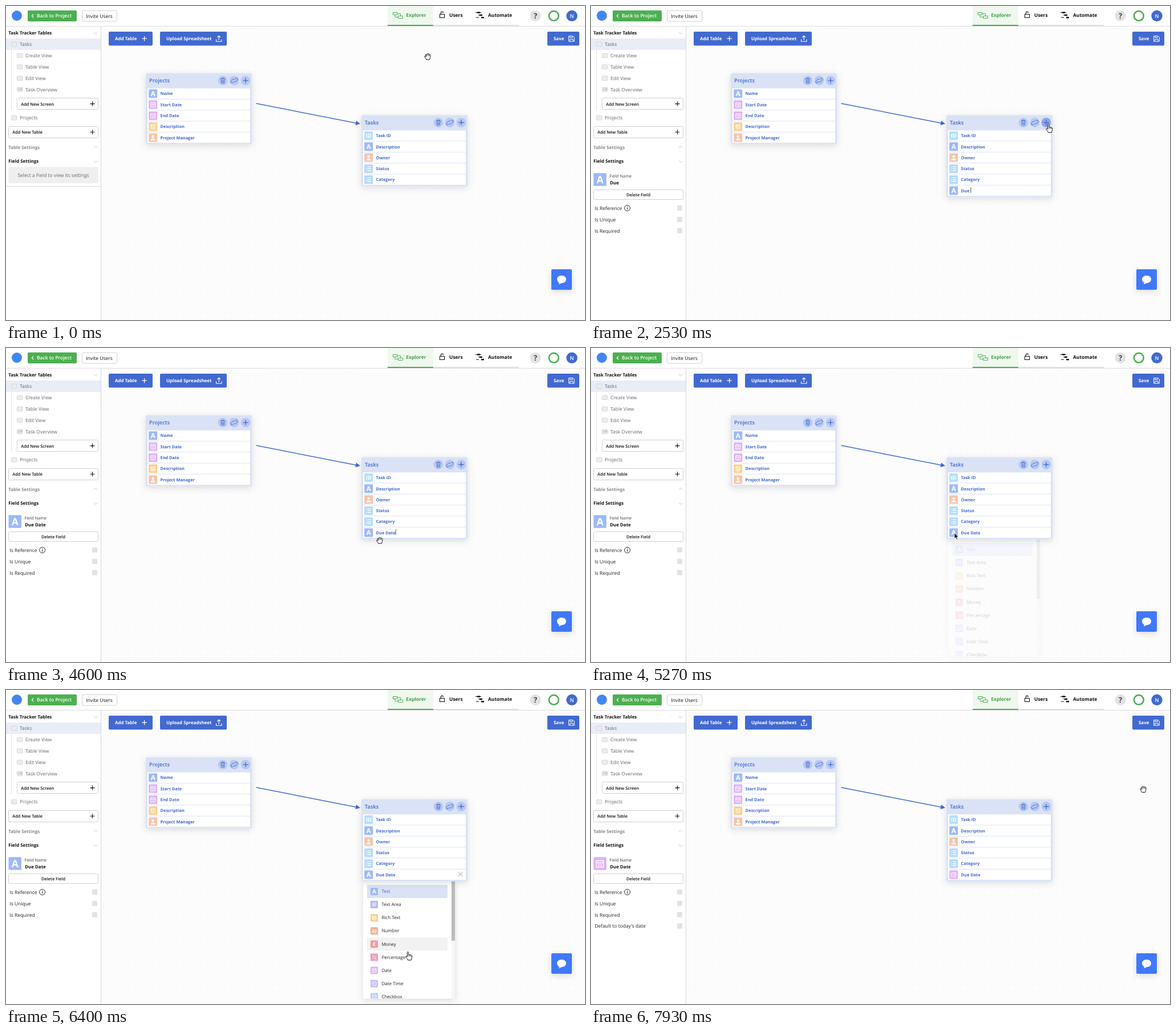
An HTML page that plays this animation: 1015 px wide and 551 px high, repeating every 8 s.

```html
<!DOCTYPE html>
<html lang="en">
<head>
<meta charset="utf-8">
<title>Table builder</title>
<style>
html, body { margin: 0; width: 100%; height: 100%; overflow: hidden; background: #fff; }
svg { display: block; width: 100vw; height: 100vh; }
text { font-family: "Open Sans", "Noto Sans", sans-serif; text-rendering: geometricPrecision; white-space: pre; }
</style>
</head>
<body>
<svg viewBox="0 0 1015 551" xmlns="http://www.w3.org/2000/svg">
  <defs>
    <pattern id="dots" x="167" y="36" width="10.58" height="10.58" patternUnits="userSpaceOnUse">
      <circle cx="5.3" cy="5.3" r=".6" fill="#e9e9ec"/>
    </pattern>
    <filter id="soft" x="-20%" y="-20%" width="140%" height="150%">
      <feDropShadow dx="0" dy="3" stdDeviation="6" flood-opacity=".13"/>
    </filter>
    <clipPath id="menuClip"><rect x="626" y="336" width="155" height="205.5"/></clipPath>
  </defs>
  <g id="base"></g>
  <g id="live"></g>
  <g id="mouse"></g>
</svg>
<script>
const BLUE = '#4169cf', GREEN = '#4caf50', PALE = '#dae2f5', INK = '#111', GREY = '#666';
const $ = id => document.getElementById(id);

const text = (x, y, s, size = 8.46, weight = 400, fill = INK, anchor = 'start') =>
  `<text x="${x}" y="${y}" font-size="${size}" font-weight="${weight}" fill="${fill}" text-anchor="${anchor}">${s}</text>`;
const rect = (x, y, w, h, fill, extra = '') =>
  `<rect x="${x}" y="${y}" width="${w}" height="${h}" fill="${fill}" ${extra}/>`;
const circle = (x, y, r, fill, extra = '') => `<circle cx="${x}" cy="${y}" r="${r}" fill="${fill}" ${extra}/>`;
const line = (d, color, w = 1, extra = '') =>
  `<path d="${d}" fill="none" stroke="${color}" stroke-width="${w}" ${extra}/>`;
const at = (x, y, body, scale = 1) => `<g transform="translate(${x} ${y}) scale(${scale})">${body}</g>`;
const plus = (x, y, r, color, w = 1.1) => line(`M${x - r} ${y}h${2 * r}M${x} ${y - r}v${2 * r}`, color, w);
const outlined = (x, y, w, h) => rect(x, y, w, h, '#fff', 'rx="2" stroke="#d0d0d0"');

// Field type icons, drawn on a 16 unit square
const glyph = (s, size) => text(0, size * .36, s, size, 700, '#fff', 'middle');
const white = (d, w = 1.2) => line(d, '#fff', w);
const calendar = white('M-4.5-3.5h9v8h-9zM-4.5-1h9M-2.2-5v2M2.2-5v2M-2.5 1h1.2M-.6 1h1.2M1.3 1h1.2M-2.5 2.8h1.2M-.6 2.8h1.2M1.3 2.8h1.2', 1);
const TYPES = {
  text: ['#9db9fb', glyph('A', 12.5)],
  area: ['#b1b6fa', white('M-4.5-3h9M-4.5 0h9M-4.5 3h9', 1.4)],
  rich: ['#f6d18f', white('M-.5-3.5h5M-.5-1h5M-4.5 1.5h9M-4.5 4h9') + rect(-4.5, -4, 3, 3.5, '#fff')],
  number: ['#f3b08e', glyph('42', 9.5)],
  money: ['#ee9f9a', glyph('£', 10.5)],
  percent: ['#ef9ab8', white('M-4 4L4-4') + circle(-2.7, -2.7, 1.4, 'none', 'stroke="#fff"') + circle(2.7, 2.7, 1.4, 'none', 'stroke="#fff"')],
  date: ['#deb0fb', calendar],
  time: ['#c9bff9', circle(0, 0, 4.5, 'none', 'stroke="#fff" stroke-width="1.1"') + white('M0-2.5V.3L2 1.5', 1)],
  check: ['#bccafa', white('M-4-4h8v8h-8zM-2 0L-.5 1.7L2.3-1.6', 1.1)],
  id: ['#b4dff8', glyph('ID', 10)],
  person: ['#f8c4a6', circle(0, -2.2, 2.4, '#fff') + '<path d="M-4.5 5C-4.5 0 4.5 0 4.5 5z" fill="#fff"/>'],
  list: ['#b3d8fb', white('M-4.8-3.5h1.6M-2-3.5h6.8M-4.8 0h1.6M-2 0h6.8M-4.8 3.5h1.6M-2 3.5h6.8', 1.5)]
};
const icon = (type, x, y, size) =>
  at(x, y, rect(-8, -8, 16, 16, TYPES[type][0], 'rx="1"') + TYPES[type][1], size / 16);

const ROW = 19.3;
function card(x, y, title, fields, hot) {
  const tool = (cx, body, on) => circle(cx, 13, 8.4, on ? '#8ea7e3' : '#b8c8f0') + body;
  const rows = fields.map(([type, name], i) => {
    const cy = 36 + i * ROW;
    return rect(3, cy - 9.2, 180, 18.3, '#fff') + icon(type, 12.7, cy, 15) + text(25.6, cy + 2.7, name, 7.36, 700, BLUE);
  }).join('');
  return at(x, y,
    rect(0, 0, 186, 28.3 + fields.length * ROW, PALE, 'rx="3" filter="url(#soft)"') +
    text(6, 16.4, title, 9.3, 600, BLUE) +
    tool(135, line('M131 10h8M133.5 10v-1.6h3V10M132 10.2l.6 7.4h4.8l.6-7.4M134.1 12v4M135.9 12v4', BLUE, .9)) +
    tool(155, line('M154 15l-1.5 1.6a2 2 0 0 1-2.9-2.9l2.6-2.6a2 2 0 0 1 2.9 0M156 11l1.5-1.6a2 2 0 0 1 2.9 2.9l-2.6 2.6a2 2 0 0 1-2.9 0', BLUE, 1)) +
    tool(175, plus(175, 13, 4.6, BLUE, 1.3), hot) + rows);
}

function header() {
  const tab = (x, s, color) => text(x, 19, s, 8.46, 700, color);
  return rect(0, 0, 1015, 35, '#fff') + line('M0 35.5H1015', '#dcdcdc') +
    circle(19, 17, 9, '#4285f4') +
    rect(38, 7.7, 86, 19.3, GREEN, 'rx="2"') + line('M48.2 14.5L45.4 17.4L48.2 20.3', '#fff', 1.2) +
    text(54, 20.4, 'Back to Project', 8.46, 600, '#fff') +
    outlined(133.5, 8, 61, 19) + text(140.3, 20.9, 'Invite Users', 8.5, 500) +
    rect(669, 0, 80, 35, '#eff7ef') + rect(669, 33, 80, 2, GREEN) + rect(749, 33, 150, 2, '#d3ebd4') +
    line('M678.5 11.5h7.5v4h-7.5zM687.5 17.5h8v4h-8zM686 13.5h5.5v4M682 15.5v4h5.5', GREEN, 1) +
    tab(701.3, 'Explorer', '#43a047') +
    line('M760.5 14.5h8v6h-8zM762.3 14.5v-2a2.2 2.2 0 0 1 4.4-.4', INK, 1.1) + tab(777, 'Users', INK) +
    line('M823 11.5h4M830 11.5h3M828 15.8h4M824 20.2h5M834 20.2h4', INK, 1) +
    line('M826 11.5h5M830 16h5M833 20.3h5', INK, 2.6) + tab(845, 'Automate', INK) +
    circle(928, 17.3, 9.6, '#e2e2e2') + text(928, 22, '?', 13, 700, '#444', 'middle') +
    circle(960.3, 17.3, 8.4, '#fff', `stroke="${GREEN}" stroke-width="2.6"`) +
    circle(992, 17.3, 9.7, BLUE) + text(992, 20.6, 'N', 9, 600, '#fff', 'middle');
}

function sidebar() {
  const folder = (x, y) => rect(x, y - 4, 9.5, 7.5, '#ededed', 'rx="1" stroke="#cfcfcf" stroke-width=".8"');
  const chevron = (y, up) => line(`M154 ${y + up}l3.3 ${-3 * up}l3.3 ${3 * up}`, '#bbb', .8);
  const views = ['Create View', 'Table View', 'Edit View', 'Task Overview'];
  return rect(0, 36, 166, 515, '#fff') + line('M166.5 36V551', '#d4d4d4') +
    text(4.3, 49.9, 'Task Tracker Tables', 7.93, 700) + chevron(47, -1) +
    rect(0, 57, 166, 20, '#e9edf8') + folder(9.5, 67.3) + text(24, 70.1, 'Tasks', 8.46, 400, GREY) +
    line('M9.5 77V182', '#dde1ea') +
    views.map((s, i) => folder(19.5, 87.2 + i * 19.9) + text(34, 90 + i * 19.9, s, 8.46, 400, GREY)).join('') +
    line('M21 145h2.5M21 147.5h2.5M25 145h2.5v2.5H25z', '#aaa', .8) +
    outlined(19.5, 161.5, 142, 20) + text(26.3, 174.7, 'Add New Screen', 7.4, 600) + plus(151.4, 171.6, 4, INK) +
    folder(9.5, 196.5) + text(24, 199.3, 'Projects', 8.46, 400, GREY) +
    outlined(4.5, 211.5, 157, 20) + text(11.3, 224.2, 'Add New Table', 7.4, 600) + plus(151.4, 221.3, 4, INK) +
    text(4.3, 250.9, 'Table Settings', 7.93, 700, '#8b8b8b') + chevron(248, 1) +
    text(4.3, 275.2, 'Field Settings', 7.93, 700) + chevron(272.5, -1);
}

function toolbar() {
  const button = (x, w, tx, s) => rect(x, 45, w, 24.5, BLUE, 'rx="2"') + text(tx, 60, s, 7.93, 700, '#fff');
  return button(180, 77, 191, 'Add Table') + plus(242.6, 57.2, 4.2, '#fff', 1.2) +
    button(270, 117, 281, 'Upload Spreadsheet') +
    line('M368.5 58.5v3.8h9.5v-3.8M373.2 60v-7.5M370.4 55l2.8-2.8l2.8 2.8', '#fff', 1.1) +
    button(949, 56, 960, 'Save') +
    line('M986.5 52.7h7.5l2.3 2.3v7h-9.8zM988.8 52.7v3h4.2v-3M988.6 62v-3.6h5.4v3.6', '#fff', 1);
}

$('base').innerHTML =
  rect(167, 36, 848, 515, '#fcfcfd') + rect(167, 36, 848, 515, 'url(#dots)') +
  header() + sidebar() + toolbar() +
  card(245, 117.8, 'Projects', [['text', 'Name'], ['date', 'Start Date'], ['date', 'End Date'],
    ['rich', 'Description'], ['person', 'Project Manager']]) +
  line('M438.5 171L614 205.5', BLUE, 1.4) + `<path d="M621 206.8l-8.6 2.4l1.6-7.9z" fill="${BLUE}"/>` +
  rect(956, 462, 36, 36, '#4078fb', 'rx="2" filter="url(#soft)"') +
  '<path d="M974 473c5 0 8 3 8 6.600s-3 6.600-8 6.600l-4.800 2.200l.6-2.800c-2.500-1.200-3.800-3.400-3.800-6c0-3.600 3-6.600 8-6.600z" fill="#fff"/>';

// All live timing is in ticks of 1/15 s
const TICKS = 120, ADD = 21, PANEL = 23, OPEN = 79, LEAVE = 89, PICK = 104;
const TYPED = [33, 35, 36, 38, 40, 43, 47, 48], NAME = 'Due Date';
const PATH = [[3, 739, 89], [16, 804, 209], [17, 800.5, 206.5], [20, 800.5, 206.5], [21, 801.5, 207.5],
  [56, 801.5, 207.5], [69, 655, 338], [76, 637, 324.3], [88, 637, 324.3], [96, 704.5, 459.5],
  [101, 699, 486.5], [104, 699, 486.5], [105, 700, 497.5], [108, 700, 497.5], [115, 984, 196], [119, 968, 174.5]];

function mouseAt(n) {
  const i = PATH.findIndex(k => k[0] >= n);
  if (i < 1) return PATH[0].slice(1);
  const [a, ax, ay] = PATH[i - 1], [b, bx, by] = PATH[i];
  const u = (n - a) / (b - a), e = u * u * (3 - 2 * u);
  return [ax + (bx - ax) * e, ay + (by - ay) * e];
}

const pen = document.createElement('canvas').getContext('2d');
function widthOf(s) {
  pen.font = '700 100px "Open Sans", "Noto Sans", sans-serif';
  return pen.measureText(s).width * .0736;
}

const overPlus = ([x, y]) => Math.hypot(x - 798, y - 204) < 9;
const inMenu = ([x, y], n) => n >= OPEN && n <= PICK && x > 626 && x < 781 && y > 336 && y < 541;

function caretOn(n) {
  if (n < ADD || n >= OPEN) return false;
  const last = TYPED.filter(k => k <= n).pop() ?? ADD;
  const since = n - last - (last === 48 ? 1 : 0);
  return since < 0 || Math.floor(since / 8) % 2 === 0;
}

const MENU = [['text', 'Text'], ['area', 'Text Area'], ['rich', 'Rich Text'], ['number', 'Number'], ['money', 'Money'],
  ['percent', 'Percentage'], ['date', 'Date'], ['time', 'Date Time'], ['check', 'Checkbox']];
function menu(n, hover) {
  if (n < OPEN || n > PICK) return '';
  const opacity = n === PICK ? .4 : Math.min(1, (n - OPEN + 1) / 5);
  const hot = inMenu(hover, n) ? Math.floor((hover[1] - 341.9) / 23.1) : -1;
  const rows = MENU.map(([type, name], i) => {
    const y = 353.5 + i * 23.1;
    const fill = i === 0 ? PALE : i === hot ? '#f2f2f2' : 'none';
    return rect(633, y - 11.5, 141, 23, fill, 'rx="1"') + icon(type, 645.5, y, 13) +
      text(658.4, y + 2.6, name, 8, 500, i ? '#222' : BLUE);
  }).join('');
  return `<g opacity="${opacity}">` + rect(626, 336, 161, 205.5, '#fff', 'filter="url(#soft)"') +
    rect(781, 336, 6, 205.5, '#f6f6f6') + rect(781, 336, 6, 104, '#bcbcbc') +
    `<path d="M632 336l4-3.500l4 3.500z" fill="#fff"/><g clip-path="url(#menuClip)">${rows}</g></g>`;
}

function panel(n, name, type) {
  if (n < PANEL)
    return rect(4.5, 282.5, 157, 28.5, '#efefef', 'rx="2"') +
      text(83, 299.8, 'Select a Field to view its settings', 8.46, 400, GREY, 'middle') + line('M0 316.5H166', '#dadada');
  const options = ['Is Reference', 'Is Unique', 'Is Required'];
  if (n > PICK) options.push("Default to today's date");
  return icon(type, 15.7, 304.6, 22.5) + text(32.4, 301.2, 'Field Name', 7.4, 400, '#444') +
    text(33.2, 313.4, name, 7.93, 700) +
    outlined(4.5, 322.5, 157, 17) + text(83, 333.9, 'Delete Field', 7.4, 600, INK, 'middle') +
    options.map((s, i) => text(6.4, 357.7 + i * 19.9, s, 8.46, 400, '#222') +
      rect(151, 350 + i * 19.9, 9, 9, '#e2e2e2', 'rx="1"')).join('') +
    circle(63.6, 354.6, 5, 'none', 'stroke="#222"') + line('M63.6 353.8v3.400M63.6 351.6v1.200', '#222', 1.1);
}

const OUTLINE = 'fill="#fff" stroke="#111" stroke-width="1" stroke-linejoin="round"';
const CURSORS = {
  grab: `<path d="M-2.200 5C-3 3-4.600 1.500-5.300 0C-5.600-1.400-4-1.600-2.600.2L-3.600-3C-3.600-4.600-2-4.700-1.600-3.200L-1.200-4.600C-.8-5.800.7-5.600.9-4.400C1.400-5.600 2.800-5.200 3-3.900C3.800-4.600 5-4 4.900-2.600C5 0 4.600 2.500 3.400 5z" ${OUTLINE}/>` +
    line('M-1.600-3.200L-1.100-1M.9-4.400V-1.200M3-3.900L2.800-1', INK, .8),
  pointer: `<path d="M-1.100 1C-1.100-.6 1-.6 1.100 1L1.300 5C2 4.300 3.200 4.500 3.500 5.400C4.300 4.800 5.400 5.200 5.500 6.200C6.500 5.800 7.300 6.500 7.300 7.500C7.400 10 6.500 12 5.800 14.500H0C-.8 12-3 10.200-3.600 8.600C-3.800 7.200-2.200 7-.9 8.800z" ${OUTLINE}/>` +
    line('M1.300 5V8M3.500 5.400V8M5.500 6.200V8.200', INK, .8),
  arrow: '<path d="M0 0V10.500L2.400 8.300L4.200 12.300L6 11.500L4.200 7.600H7.400z" fill="#111" stroke="#fff" stroke-width=".9"/>'
};

function draw(n) {
  const pos = mouseAt(n), [x, y] = pos, hover = mouseAt(n - 1);
  const name = NAME.slice(0, TYPED.filter(k => k <= n).length);
  const type = n >= PICK ? 'date' : 'text';
  const fields = [['id', 'Task ID'], ['text', 'Description'], ['person', 'Owner'], ['list', 'Status'], ['list', 'Category']];
  if (n >= ADD) fields.push([type, name]);
  const bottom = 219.8 + fields.length * ROW;
  const inCard = x > 623 && x < 809 && y > 191 && y < bottom;

  let row = '';
  if (n >= ADD && !name) row += text(648.6, 326.2, 'Enter Field Name', 7.3, 700, '#b4c3ea');
  if (caretOn(n)) row += rect(648.8 + widthOf(name), 318.3, .9, 9.5, '#333');
  const rowHover = n < OPEN ? n > ADD && inCard && y > 314 : n >= LEAVE && n < PICK;
  if (rowHover) row += line('M792.5 319.300l8 8M800.5 319.300l-8 8', '#999', 1);

  $('live').innerHTML = panel(n, name, type) + menu(n, hover) +
    card(623, 191.500, 'Tasks', fields, overPlus(pos)) + row;
  const kind = overPlus(pos) || (inMenu(pos, n) && n < PICK + 1) ? 'pointer' : inCard ? 'arrow' : 'grab';
  $('mouse').innerHTML = at(x, y, CURSORS[kind]);
}

let start, shown = -1;
function tick(now) {
  start ??= now;
  const n = Math.floor(((now - start) % 8000 + 5) * .015) % TICKS;
  if (n !== shown) draw(shown = n);
  requestAnimationFrame(tick);
}
draw(0);
requestAnimationFrame(tick);
</script>
</body>
</html>
```
